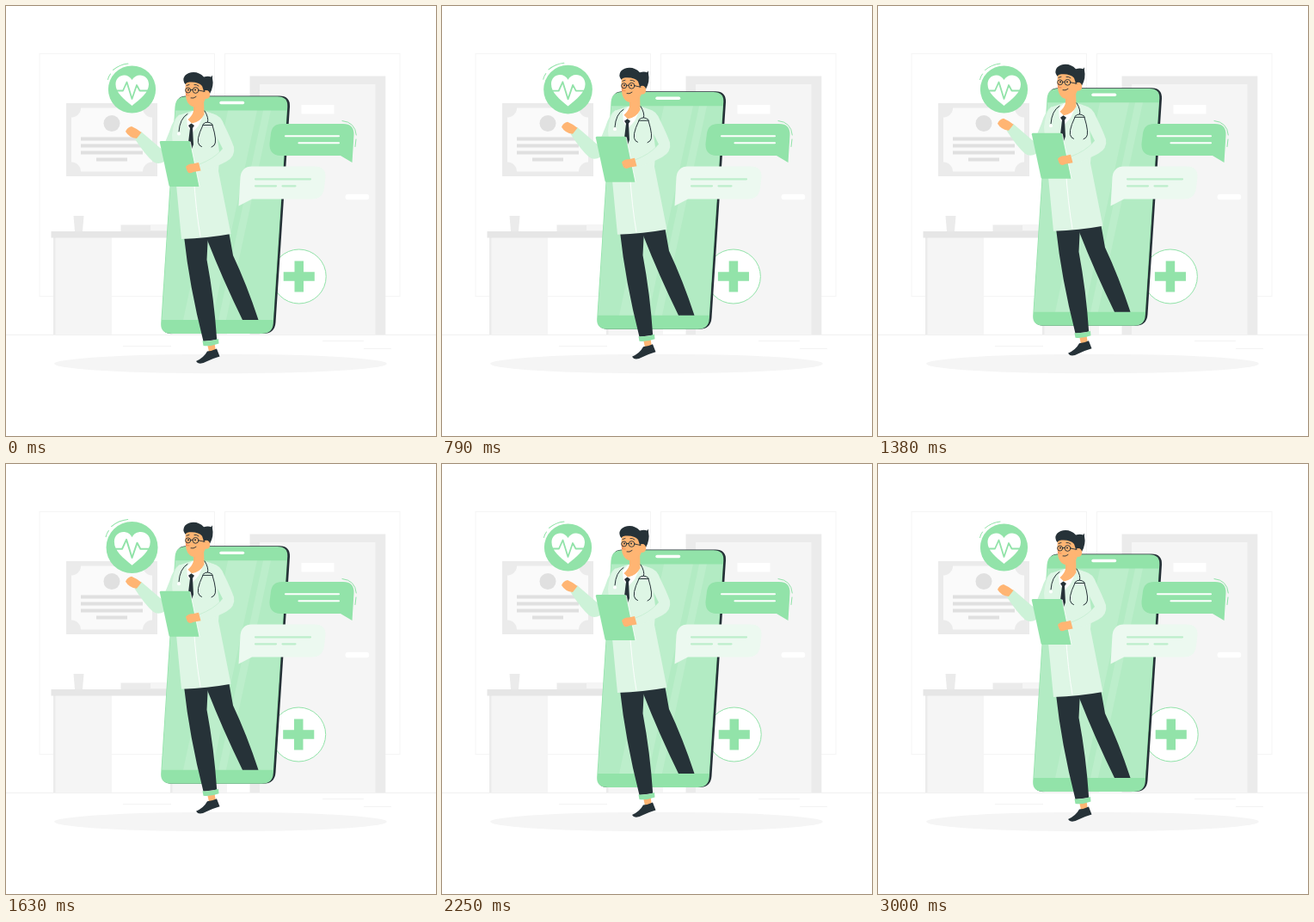
Write an HTML page that moves like this. It is 500 by 500 pixels and loops after 3.04 s.

```html
<!DOCTYPE html>
<html lang="en">
<head>
<meta charset="utf-8">
<title>Online doctor</title>
<style>
  html, body { margin: 0; width: 100%; height: 100%; overflow: hidden; background: #fff; }
  svg { display: block; width: 100vw; height: 100vh; }
  .line { fill: none; stroke-linecap: round; stroke-linejoin: round; }
  .green { fill: #92e3a9; }
  .mint { stroke: #92e3a9; }
  .dark { fill: #263238; }
  .ink { stroke: #263238; }
  .skin { fill: #ffb573; }
  .coat { fill: #def6e5; }
</style>
</head>
<body>
<svg viewBox="0 0 500 500">
  <!-- room -->
  <g fill="#fff" stroke="#f5f5f5">
    <rect x="39" y="55.5" width="203.500" height="282"/>
    <rect x="254.500" y="55.5" width="203.500" height="282"/>
  </g>
  <path d="M0 382.400H500" stroke="#ebebeb" stroke-width=".8"/>
  <path d="M136 395.500H192M368 389.500H416M416 398.500H448" stroke="#f3f3f3"/>
  <ellipse cx="249.500" cy="416" rx="193.500" ry="11.300" fill="#f5f5f5"/>

  <!-- door -->
  <path d="M283.500 81.500H441.300V382H283.500Z" fill="#ebebeb"/>
  <path d="M295 91H429.500V382H295Z" fill="#f5f5f5"/>
  <rect x="343.500" y="115" width="38" height="10.500" fill="#fff"/>
  <rect x="394.500" y="218.800" width="27.800" height="6.400" rx="3.200" fill="#fff"/>

  <!-- certificate -->
  <path d="M70 113H176V198H70Z" fill="#ebebeb"/>
  <path d="M87 118.500H159A11 11 0 0 0 170 129.500V181.500A11 11 0 0 0 159 192.500H87A11 11 0 0 0 76 181.500V129.500A11 11 0 0 0 87 118.500Z" fill="#fafafa"/>
  <circle cx="123" cy="136.500" r="9.500" fill="#e0e0e0"/>
  <path d="M87 154.500H159M87 162.500H159M87 170.500H159M105 178.500H141" stroke="#e0e0e0" stroke-width="3.800"/>

  <!-- desk -->
  <path d="M55 269H123V382H55ZM191 269H257V382H191Z" fill="#f5f5f5"/>
  <path d="M55 269H57.500V382H55ZM191 269H193.500V382H191Z" fill="#ebebeb"/>
  <path d="M52.500 262H265V269.500H52.500Z" fill="#e6e6e6"/>
  <path d="M78.500 244H90.500L89 262H80ZM133.500 254.500H195V262H133.500Z" fill="#ebebeb"/>
  <path d="M168 254.500H195V261H168Z" fill="#f5f5f5"/>

  <g id="plus">
    <circle cx="340.700" cy="314.500" r="31.500" fill="#fff" class="mint"/>
    <path d="M335.500 296.500h10.500v12.800h12.800v10.500h-12.800v12.800h-10.500v-12.800h-12.800v-10.500h12.800Z" class="green"/>
  </g>

  <g id="beat">
    <circle cx="146.500" cy="97" r="27.600" class="green"/>
    <path d="M146.500 116C137 108 127.500 101 127.500 91C127.500 79 142 77 146.500 86C151 77 166 79 166 91C166 101 156 108 146.500 116Z" fill="#fff"/>
    <path d="M127 98.500H136L140.500 88.500L146.500 108L152 92L155.500 98.500H166" class="line mint" stroke-width="1.800"/>
    <path d="M124.500 74.500Q132 68 142 67M118.500 85.500Q119.500 81.500 121.500 79" class="line mint"/>
  </g>

  <g id="float">
    <!-- phone -->
    <path d="M210 104.500H318Q330.500 104.500 330 117L313.500 368Q312.500 381 299 381H193Q180 381 181 368L197.500 116Q198.500 104.500 210 104.500Z" class="dark"/>
    <path d="M209 105.200H315.500Q328 105.200 327.300 117L310.800 369Q310 381 297.500 381H192.500Q179.500 381 180.200 369L196.500 117Q197.500 105.200 209 105.200Z" class="green"/>
    <path d="M196.800 121.500H326.500L310.500 365H181.200Z" fill="#b2ebc3"/>
    <path d="M258 121.500H292L240 365H206ZM299 121.500H308L256 365H247Z" fill="#fff" opacity=".13"/>
    <path d="M250 112.500H275.500" class="line" stroke="#fff" stroke-width="3.400"/>

    <!-- legs -->
    <path d="M233 266L259 262L264 290Q280 324 293.500 365H275Q252 318 234 272Z" class="dark"/>
    <path d="M207 268L235 265L233.500 295Q242 340 245.200 388L229.500 390Q213 325 207 268Z" class="dark"/>
    <path d="M234 393L242.500 392L244 402L236 402Z" class="skin"/>
    <path d="M228.500 389.500Q239 390 247 387L247.500 392.500Q238 396 229.500 395Z" class="green"/>
    <path d="M221 413Q230 409 234 401.500Q240 401 245 398.500L248.500 407.500Q240 410 234 413Q224 418.500 221 413Z" class="dark"/>

    <!-- coat -->
    <path d="M202 126Q195 130 190 146L181.500 167L157 146L149.500 154Q161 172 171 181Q177 185 184 181L202 165Z" fill="#cdf2d8"/>
    <path d="M201 127L216 122L234 123Q248 126 251 142L247 192L261.500 265Q234 270 204 271L198 208L193 150Q195 132 201 127Z" class="coat"/>
    <path d="M240 125Q250 127 254 139Q261 153 265 164Q267 175 256 181Q243 188 226 193L224 184Q239 179 247 170L242 145Z" class="coat"/>
    <path d="M246 154L252 166L248 170Z" fill="#b2ebc3"/>
    <path d="M225 184Q241 178 250 168" class="line" stroke="#c5eed1" stroke-width=".8"/>
    <path d="M218 195Q221 240 226 268" class="line" stroke="#fff" stroke-width=".9"/>

    <!-- neck, tie, stethoscope -->
    <path d="M210 129L217 122L231 124L224 139L216 148L211 140Z" fill="#fff"/>
    <path d="M218 113L230 106L230.500 126Q226 135 216 136.500L211.500 132Q217 127 218 122Z" class="skin"/>
    <path d="M212 139L215.500 136.500L219 139L217 142L218 161L215 169L211.500 163L214 142Z" class="dark"/>
    <g class="line ink">
      <path d="M211 125.500Q202 131 201 146M231 122Q236 130 234.500 135M229 137.500Q234 132.500 240 137.500"/>
      <path d="M229 138.500H240M229 138.500Q220 157 225 162L227.500 163.500M240 138.500Q246 158 242 162L239 164"/>
    </g>
    <circle cx="201" cy="148.500" r="2" fill="#fff"/>

    <!-- head -->
    <path d="M209 88Q216 84 230 90L233 104Q230 117 220 117.500Q212 117 209.500 108Q207.500 98 209 88Z" class="skin"/>
    <path d="M208.500 91Q204.500 86 208 81Q212 77 218 77Q225 77 230 82.500Q235 81 238.500 82.500L240 80.500L240 84Q242 93 237 102L230 103Q230 97 228 93Q224 88 214 88.500Q210 88 208.500 91Z" class="dark"/>
    <ellipse cx="233" cy="103" rx="4.200" ry="5" class="skin"/>
    <path d="M211 99L209.500 103.500L213 104" class="line" stroke="#f28f5c" stroke-width="1.200"/>
    <g class="line ink" stroke-width=".9">
      <circle cx="211.700" cy="98" r="3"/>
      <circle cx="220.500" cy="98" r="3.400"/>
      <path d="M214.700 97.500L217 97.500M224 98L231 99.500M210 92.500L213 91.500M219 91.500Q222 91 224 93M215 107Q218 108 221 105.500"/>
    </g>
    <circle cx="212" cy="97.500" r="1" class="dark"/>
    <circle cx="220" cy="97.500" r="1" class="dark"/>

    <!-- clipboard and hands -->
    <path d="M180 157H212.500Q214 157 214.400 158.500L225 210H191.500Q190 210 189.500 208.500L178.800 158.500Q178.500 157 180 157Z" class="green"/>
    <path d="M214.300 158L225 210" class="line" stroke="#fff" stroke-width=".8"/>
    <path d="M209 187Q212 183 217 183.500L224 182L226.500 191.500L218 193Q212 196 210.500 191.500Z" class="skin"/>
    <path d="M139 146Q141 141 146 140Q153 143 157.500 147L152 154Q143 153 139 146Z" class="skin"/>
  </g>

  <!-- chat bubbles -->
  <path d="M321 137H392Q405 137 404.500 150L402.500 182L389 174H319Q306 173.500 306.500 160L308 148Q309.500 137 321 137Z" class="green"/>
  <path d="M325 151.300H387M340.500 159.300H387" class="line" stroke="#fff" stroke-width="2.100"/>
  <path d="M391 133.500Q406 135 407.300 150M407 155L406 163.500" class="line mint"/>
  <path d="M286 186.500H359Q372 186.500 371.500 199L370 212Q368 224.500 356 224.500H286L270.500 232.500L272.500 199Q274 186.500 286 186.500Z" fill="#ecf9f0"/>
  <path d="M290 201.300H354M290 209.300H314M321.500 209.300H336.500" class="line" stroke="#bdeecb" stroke-width="2.200"/>
</svg>
<script>
  const LOOP = 3040, CYCLE = 3000;
  const $ = id => document.getElementById(id);
  const [float, plus, beat] = ['float', 'plus', 'beat'].map($);

  // Linear interpolation through [percent, value] stops.
  const track = (stops, p) => {
    const i = Math.max(1, stops.findIndex(s => s[0] >= p));
    const [a, u] = stops[i - 1], [b, v] = stops[i];
    return u + (v - u) * (p - a) / (b - a);
  };
  const lift = [[0, 0], [50, -10], [100, 0]];
  const shake = [0, -1, 2, -4, 4, -4, 4, -4, 2, -1, 0].map((x, i) => [i * 10, x]);
  const pulse = [[0, 1], [10, 1.1], [15, 1], [50, 1], [60, 1.1], [65, 1], [100, 1]];

  function draw() {
    const t = Math.min(performance.now() % LOOP, CYCLE);
    const p = t / CYCLE * 100;
    float.setAttribute('transform', `translate(0 ${track(lift, p)})`);
    plus.setAttribute('transform', `translate(${track(shake, p)} 0)`);
    beat.setAttribute('transform', `translate(146 96) scale(${track(pulse, p * 2 % 100)}) translate(-146 -96)`);
    requestAnimationFrame(draw);
  }
  draw();
</script>
</body>
</html>
```
